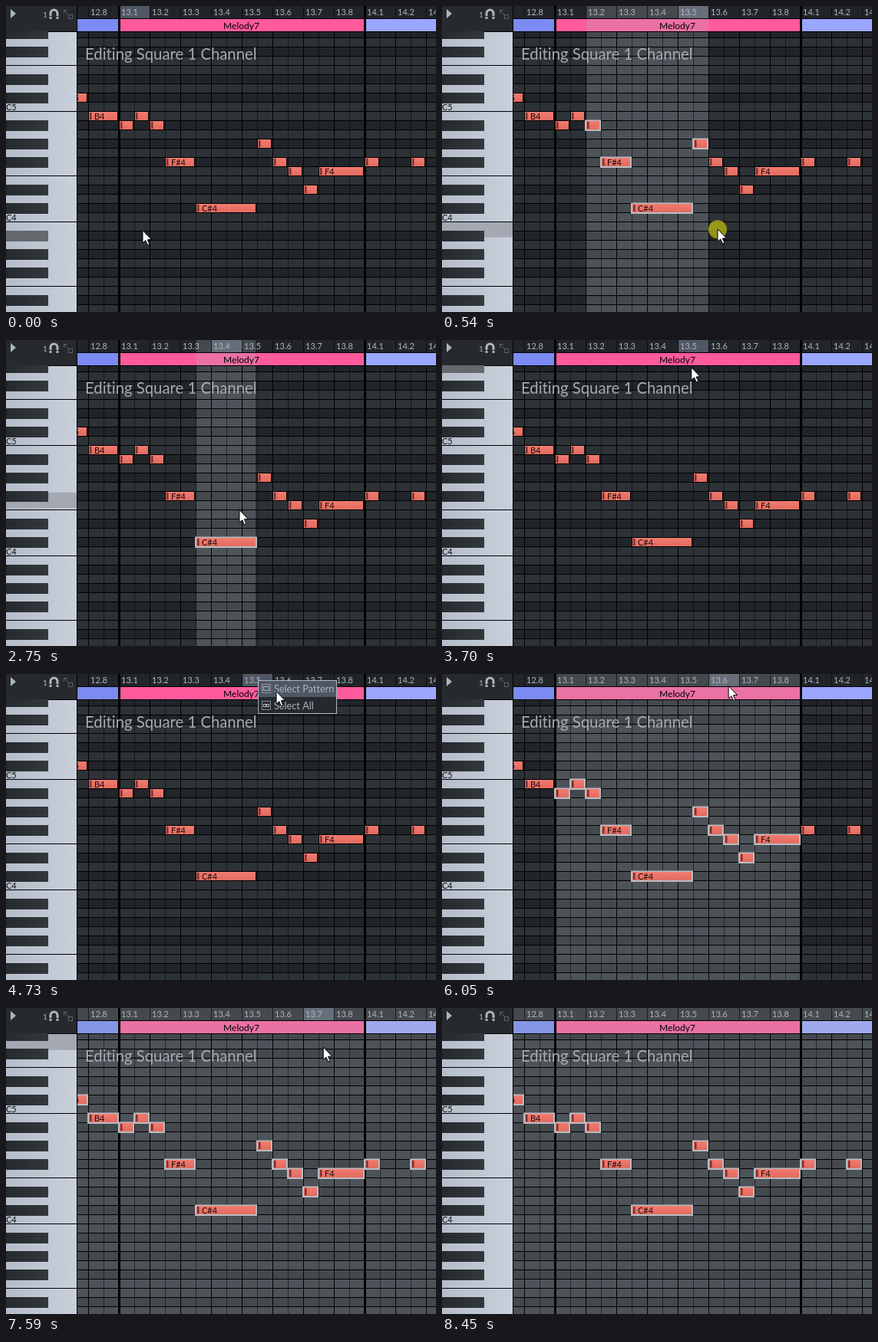
Animation, 560 px wide and 399 px high, one loop 8830 ms. Source, as an HTML page with a canvas:

```html
<!DOCTYPE html>
<html lang="en">
<head>
<meta charset="utf-8">
<title>Piano roll selection</title>
<style>
html, body { margin: 0; width: 100%; height: 100%; overflow: hidden; background: #212529; }
canvas { display: block; }
</style>
</head>
<body>
<canvas id="stage" width="560" height="399"></canvas>
<script>
const ctx = document.getElementById('stage').getContext('2d');
const W = 560, H = 399, LOOP = 8830, STEP = 79;
const LEFT = 93, TOP = 34, ROW = 12, BEAT = 40, BAR = 8 * BEAT, BAR_X = 148, C4_Y = 281;
const OCTAVE = 12 * ROW;
const SCALE = 'C C# D D# E F F# G G# A A# B'.split(' ');
const WHITES = SCALE.filter(n => n.length === 1);
const GREY = '#adb5bd', HOVER = '#505764', DARK = '#262a2e';

// name:length in half beats, "-" is a rest
const MELODY = 'C#5:2 B4:2 A#4 B4 A#4 F#4:2 C#4:4 G#4 F#4 F4 D#4 F4:3 F#4 -:2 F#4';

const START = { x: 178, y: 293 };
const DRAG = { from: 230, to: 1010, until: 1410 };
const glide = (at, steps, x, y) => ({ at, steps, x, y });
const GLIDES = [
  glide(70, 1, 191, 292),
  glide(310, 8, 415, 291),
  glide(1250, 7, 281.5, 213.5),
  glide(2280, 5, 304, 222),
  glide(3220, 11, 328, 8),
  glide(4500, 4, 352, 23),
  glide(5970, 5, 385, 12),
  glide(6660, 6, 407, 39),
  glide(7510, 3, 414, 53),
  glide(7900, 8, 530, 420)
];

// "until" is when the resulting selection is dropped
const RULER_ITEMS = ['Select Pattern', 'Select All'];
const MENUS = [
  { open: 2120, close: 2750, until: 3540, items: ['Select Note Range'] },
  { open: 4260, close: 5200, until: 6130, items: RULER_ITEMS },
  { open: 6590, close: 7270, until: LOOP, items: RULER_ITEMS }
];

const within = (t, a, b) => t >= a && t < b;
const mod = (n, m) => (n % m + m) % m;
const isBlack = s => SCALE[mod(s, 12)].length > 1;
const rowY = s => C4_Y - ROW * (s + 1);
const snap = (x, round) => BAR_X + BEAT * round((x - BAR_X) / BEAT);

function readMelody() {
  let x = BAR_X - 2 * BEAT;
  return MELODY.split(' ').map(word => {
    const [name, units = 1] = word.split(':');
    const note = { name, x, w: units * BEAT / 2 - 2 };
    note.semi = SCALE.indexOf(name.slice(0, -1)) + 12 * (name.slice(-1) - 4);
    x += units * BEAT / 2;
    return note;
  }).filter(note => note.name !== '-');
}
const NOTES = readMelody();

function rect(x, y, w, h, fill) {
  ctx.fillStyle = fill;
  ctx.fillRect(x, y, w, h);
}

function setFont(size) {
  ctx.font = size + 'px Lato, "Open Sans", sans-serif';
  ctx.letterSpacing = '0.01px';
}

function label(str, x, y, size, fill, align = 'left') {
  setFont(size);
  ctx.textAlign = align;
  ctx.fillStyle = fill;
  ctx.fillText(str, x, y);
}

function path(points) {
  ctx.beginPath();
  points.forEach(([x, y]) => ctx.lineTo(x, y));
}

function gradient(x1, y0, y1, a, b) {
  const g = ctx.createLinearGradient(0, y0, x1, y1);
  g.addColorStop(0, a);
  g.addColorStop(1, b);
  return g;
}

function cursorAt(t) {
  let { x, y } = START;
  for (const g of GLIDES) {
    if (t < g.at) break;
    const step = Math.round((t - g.at) / STEP) + 1;
    const p = 1 - (1 - Math.min(1, step / g.steps)) ** 2;
    x += (g.x - x) * p;
    y += (g.y - y) * p;
  }
  return { x, y };
}

function pickedItem(menu, cursor) {
  const dy = cursor.y - cursorAt(menu.open).y;
  return dy > 1 ? Math.floor(dy / 22) : -1;
}

function rangeOf(menu) {
  const item = menu.items[pickedItem(menu, cursorAt(menu.close))];
  const { x } = cursorAt(menu.open);
  if (item === 'Select All') return [0, W + 1];
  if (item === 'Select Pattern') return [BAR_X, BAR_X + BAR];
  const note = NOTES.find(n => within(x, n.x, n.x + n.w));
  return [note.x, note.x + note.w];
}

function selectionAt(t) {
  if (within(t, DRAG.from, DRAG.until)) {
    const end = cursorAt(Math.min(t, DRAG.to)).x;
    return [snap(cursorAt(DRAG.from).x, Math.round), snap(end, Math.round)];
  }
  const menu = MENUS.find(m => within(t, m.close, m.until));
  return menu ? rangeOf(menu) : [0, 0];
}

// The hover lags while dragging and freezes from a menu opening to the next glide.
function hoverAt(t) {
  if (within(t, DRAG.from + STEP, DRAG.to)) return cursorAt(t - STEP);
  const menu = MENUS.findLast(m => t >= m.open);
  const resume = menu && GLIDES.find(g => g.at > menu.close).at;
  return cursorAt(t < resume ? menu.open : t);
}

function isPressed(t) {
  return within(t, DRAG.from, DRAG.to) ||
    MENUS.some(m => [m.open, m.close].some(end => within(t, end - STEP - 1, end)));
}

function drawGrid(hover, [a, b]) {
  for (let y = C4_Y - 21 * ROW, s = 20; y < H; y += ROW, s--) {
    rect(LEFT, y, W, ROW, isBlack(s) ? '#212529' : '#2d3237');
  }
  rect(LEFT, TOP, W, 3, '#212529');
  rect(LEFT, 0, W, 17, '#212529');
  if (hover.y < H) rect(snap(hover.x, Math.floor), 0, BEAT - 1, 16, HOVER);
  ['#7b8bf3', '#ff5b9c', '#9ba6ff'].forEach((fill, i) => {
    rect(BAR_X + 1 + (i - 1) * BAR, 17, BAR, 16, fill);
  });

  if (b > a) rect(Math.max(a, LEFT), 0, b - 1 - Math.max(a, LEFT), H, 'rgba(173,181,189,.25)');

  for (let y = C4_Y - 20 * ROW; y < H; y += ROW) rect(LEFT, y, W, 1, '#000');
  for (let i = -2; i < 21; i++) {
    const x = BAR_X - 1 + i * BEAT / 2;
    rect(x, TOP, 1, H, i % 2 ? 'rgba(0,0,0,.5)' : '#000');
    if (i % 2 === 0) rect(x, 0, 1, 16, 'rgba(0,0,0,.6)');
    if (i % 16 === 0) rect(x - 1, 0, 3, H, '#000');
  }
  rect(LEFT, 16, W, 1, '#000');
  rect(0, 33, W, 1, '#000');

  for (let i = -1; i < 11; i++) {
    const name = 13 + Math.floor(i / 8) + '.' + (mod(i, 8) + 1);
    label(name, BAR_X + i * BEAT + 2, 12, 11, GREY);
  }
  label('Melody7', BAR_X + BAR / 2 - 1.5, 30, 12, '#000', 'center');
}

function drawNotes([a, b]) {
  ctx.save();
  ctx.beginPath();
  ctx.rect(LEFT, TOP, W, H);
  ctx.clip();
  for (const { name, semi, x, w } of NOTES) {
    const y = rowY(semi);
    if (within(x, a, b)) rect(x - 2, y - .5, w + 3, ROW + 2.5, '#b8bdc3');
    else rect(x - 1, y, w + 1, ROW + 1, '#000');
    rect(x, y + 1, w - 1, ROW - 1, gradient(0, y, y + ROW, '#f37d72', '#e26b60'));
    rect(x + 1, y + 2, 2.5, ROW - 3, '#7b322f');
    if (w > BEAT / 2) label(name, x + 7, y + 11, 11, '#1a0b0a');
  }
  ctx.restore();
}

function drawKeys(hover) {
  rect(0, TOP, 92, H, gradient(92, 0, 0, '#b4bdc9', '#c9d0db'));
  const key = within(hover.y, TOP, H) ? Math.ceil((C4_Y - hover.y) / ROW) - 1 : null;
  if (key !== null && !isBlack(key)) {
    const size = OCTAVE / 7, index = WHITES.indexOf(SCALE[mod(key, 12)]);
    const y = C4_Y - OCTAVE * Math.floor(key / 12) - size * (index + 1);
    rect(0, y, 92, size, '#a3a8b3');
  }
  for (let s = -11; s < 21; s++) {
    const fill = s === key ? '#66696c' : gradient(55, 0, 0, DARK, '#33383d');
    if (isBlack(s)) rect(0, rowY(s), 55, ROW + 2, fill);
    else if (!isBlack(s - 1)) rect(0, rowY(s) + ROW, 92, 1, '#000');
  }
  for (const octave of [4, 5]) {
    label('C' + octave, 0, C4_Y - 1 - OCTAVE * (octave - 4), 11, '#111');
  }
  rect(92, 0, 1, H, '#000');
}

function drawCorner() {
  rect(0, 0, 92, 33, DARK);
  path([[6, 4], [13, 10], [6, 16]]);
  ctx.fillStyle = GREY;
  ctx.fill();
  label('1', 48, 15, 10, GREY);

  ctx.lineWidth = 3;
  ctx.strokeStyle = GREY;
  ctx.beginPath();
  ctx.moveTo(58, 17);
  ctx.arc(62.5, 9.5, 4.5, Math.PI, 0);
  ctx.lineTo(67, 17);
  ctx.stroke();
  rect(56, 13, 13, 1, DARK);

  ctx.lineWidth = 1;
  ctx.strokeStyle = '#5b6269';
  ctx.strokeRect(81.5, 11.5, 5, 5);
  path([[80, 5.5], [75.5, 5.5], [75.5, 10], [75.5, 5.5], [81, 11]]);
  ctx.stroke();
}

function drawMenu(menu, cursor) {
  const { x, y } = cursorAt(menu.open);
  const picked = pickedItem(menu, cursor);
  setFont(12.7);
  const w = 25 + Math.round(Math.max(...menu.items.map(s => ctx.measureText(s).width)));
  rect(x, y, w, menu.items.length * 22, DARK);
  ctx.lineWidth = 1;
  ctx.strokeStyle = GREY;
  menu.items.forEach((item, i) => {
    const top = y + i * 22;
    if (i === picked) rect(x, top, w, 22, HOVER);
    ctx.setLineDash([2, 1]);
    ctx.strokeRect(x + 5.5, top + 5.5, 11, 11);
    ctx.setLineDash([]);
    if (item === 'Select All') {
      ctx.strokeRect(x + 7.5, top + 9.5, 3, 3);
      ctx.strokeRect(x + 11.5, top + 9.5, 3, 3);
    } else {
      ctx.strokeRect(x + 7.5, top + 8.5, 7, 5);
    }
    label(item, x + 21, top + 16, 12.7, GREY);
  });
  ctx.strokeRect(x + .5, y + .5, w - 1, menu.items.length * 22 - 1);
}

function drawCursor({ x, y }, pressed) {
  ctx.save();
  ctx.translate(x, y);
  if (pressed) {
    ctx.beginPath();
    ctx.arc(0, 0, 12, 0, Math.PI * 2);
    ctx.fillStyle = 'rgba(190,185,15,.75)';
    ctx.fill();
  }
  path([[0, -.5], [0, 16], [3.7, 12.7], [6.4, 18.6], [8.9, 17.5], [6.3, 11.8], [11.3, 11.5]]);
  ctx.closePath();
  ctx.fillStyle = '#fff';
  ctx.fill();
  ctx.lineWidth = 1;
  ctx.lineJoin = 'round';
  ctx.strokeStyle = '#000';
  ctx.stroke();
  ctx.restore();
}

function draw(t) {
  const cursor = cursorAt(t), hover = hoverAt(t), selection = selectionAt(t);
  drawGrid(hover, selection);
  drawNotes(selection);
  label('Editing Square 1 Channel', 103, 70, 20.3, '#a4abb2');
  drawKeys(hover);
  drawCorner();
  const menu = MENUS.find(m => within(t, m.open, m.close));
  if (menu) drawMenu(menu, cursor);
  drawCursor(cursor, isPressed(t));
}

const start = performance.now();
function tick() {
  draw((performance.now() - start) % LOOP);
  requestAnimationFrame(tick);
}
tick();
</script>
</body>
</html>
```
